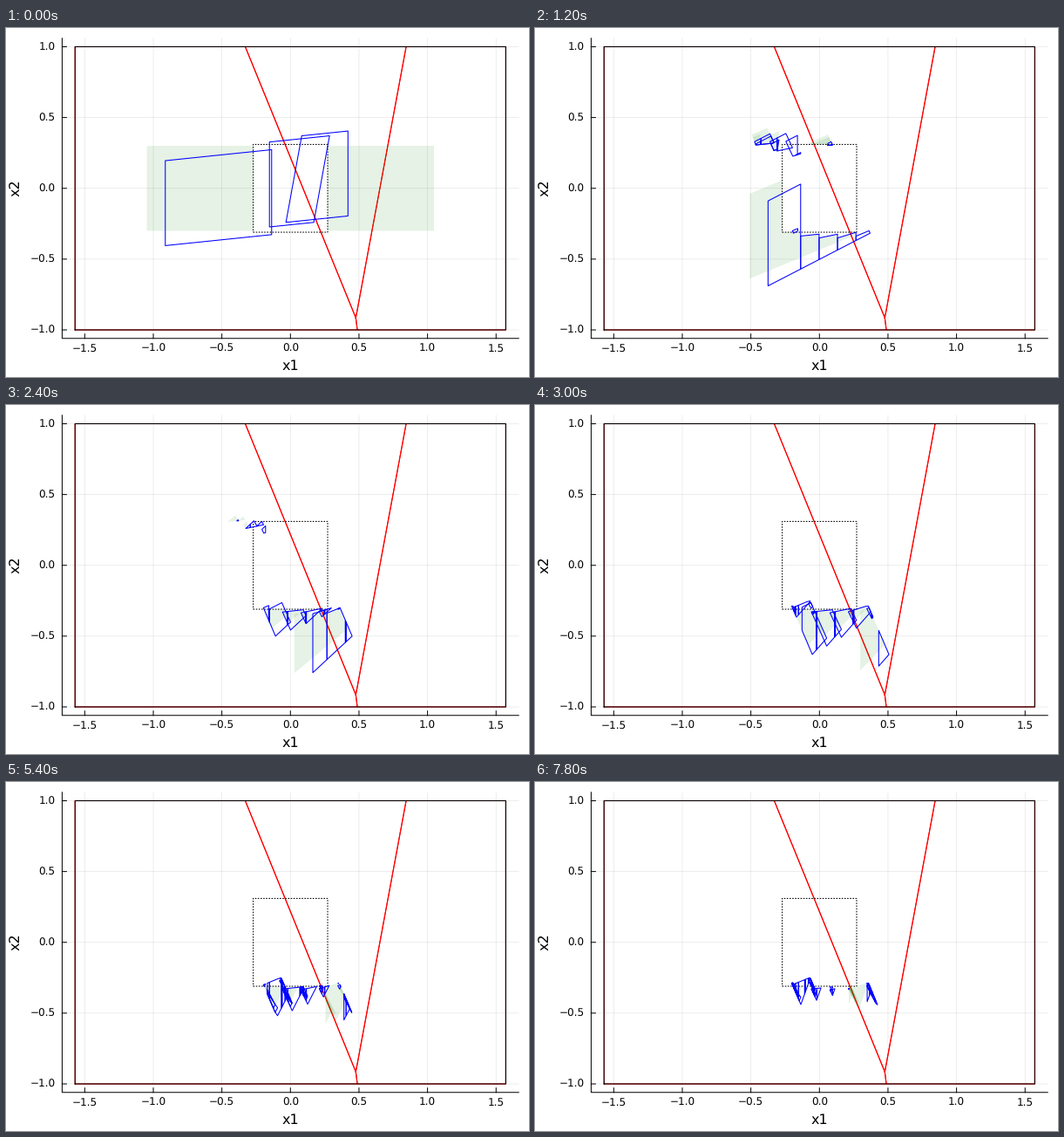
A matplotlib script for the animation above (8 s loop, 600x400 px).

```python
import matplotlib.pyplot as plt
import numpy as np
from matplotlib.animation import FuncAnimation
from matplotlib.collections import PolyCollection

W, H, DPI = 600, 400, 100
PX = 72 / DPI                      # one pixel in points
STEP_FRAMES, FRAMES, INTERVAL = 3, 80, 100
plt.rcParams.update({"font.family": "DejaVu Sans", "path.snap": False,
                     "text.hinting": "none"})

# Piecewise-affine dynamics: x1 gets a constant push per region, x2 integrates x1.
DT = 0.1
BOX_X, BOX_Y = 0.2715, 0.31
DOM_X, DOM_Y = np.pi / 2, 1.0
HUB = (0.477, -0.915)
TOP_L, TOP_R, FOOT = (-0.3295, 1.0), (0.844, 1.0), (0.488, -1.0)


def left_of(p, q):
    """Half-plane a*x + b*y + c >= 0 to the left of the ray p -> q."""
    a, b = p[1] - q[1], q[0] - p[0]
    return a, b, -(a * p[0] + b * p[1])


def flip(plane):
    return tuple(-v for v in plane)


RED_L, RED_R, RED_D = left_of(HUB, TOP_L), left_of(HUB, TOP_R), left_of(HUB, FOOT)
REGIONS = [
    ((RED_L, flip(RED_D)), 0.1345),
    ((RED_R, flip(RED_L)), -0.4245),
    ((RED_D, flip(RED_R)), -0.6275),
]
OUTSIDE = [(-1, 0, -BOX_X), (1, 0, -BOX_X), (0, 1, -BOX_Y), (0, -1, -BOX_Y)]


def clip(poly, plane):
    a, b, c = plane
    out = []
    for p, q in zip(poly, poly[1:] + poly[:1]):
        dp, dq = a * p[0] + b * p[1] + c, a * q[0] + b * q[1] + c
        if dp >= 0:
            out.append(p)
        if dp * dq < 0:
            t = dp / (dp - dq)
            out.append((p[0] + t * (q[0] - p[0]), p[1] + t * (q[1] - p[1])))
    return out


def solid(poly):
    area = sum(p[0] * q[1] - q[0] * p[1] for p, q in zip(poly, poly[1:] + poly[:1]))
    return len(poly) > 2 and abs(area) > 2e-7


def remove_box(polys):
    pieces = []
    for poly in polys:
        for plane in OUTSIDE:
            pieces.append(clip(poly, plane))
            poly = clip(poly, flip(plane))
    return [p for p in pieces if solid(p)]


def advance(polys):
    images = []
    for poly in polys:
        for planes, push in REGIONS:
            part = poly
            for plane in planes:
                part = clip(part, plane)
            if solid(part):
                images.append([(x + push, y + DT * x) for x, y in part])
    return images


def rect(w, h):
    return [(-w, -h), (w, -h), (w, h), (-w, h)]


def simulate(count):
    states, reach = [], [rect(np.pi / 3, 0.3)]
    for _ in range(count):
        current = remove_box(reach)
        reach = advance(current)
        states.append((current, reach))
    return states


STATES = simulate(-(-FRAMES // STEP_FRAMES))

LIM_X, LIM_Y = 1.06 * DOM_X, 1.06 * DOM_Y
AX_W, AX_H = 523.8, 344
UNIT_X, UNIT_Y = AX_W / 2 / LIM_X, AX_H / 2 / LIM_Y     # pixels per data unit
TICK = 5

fig = plt.figure(figsize=(W / DPI, H / DPI), dpi=DPI, facecolor="white")
ax = fig.add_axes([64.4 / W, 1 - 355.75 / H, AX_W / W, AX_H / H])
ax.set_xlim(-LIM_X, LIM_X)
ax.set_ylim(-LIM_Y, LIM_Y)
ax.axis("off")


def outline(points, color, width=1.0, **kw):
    xs, ys = zip(*points)
    ax.plot(xs, ys, color=color, lw=width * PX, clip_on=False,
            scalex=False, scaley=False, **kw)


def closed(points):
    return points + points[:1]


def label(x, y, text, size, **kw):
    fig.text(x / W, 1 - y / H, text, fontsize=size * PX, **kw)


def number(v):
    return f"{v:.1f}".replace("-", "\u2212")


grid = dict(color="black", alpha=0.1, width=0.7, zorder=1)
for v in np.arange(-1.5, 1.6, 0.5):
    outline([(v, -LIM_Y), (v, LIM_Y)], **grid)
    outline([(v, -LIM_Y), (v, -LIM_Y + TICK / UNIT_Y)], "black")
    label(326.3 + UNIT_X * v, 371.3, number(v), 12, ha="center", va="baseline")
for v in np.arange(-1, 1.1, 0.5):
    outline([(-LIM_X, v), (LIM_X, v)], **grid)
    outline([(-LIM_X, v), (-LIM_X + TICK / UNIT_X, v)], "black")
    label(56.5, 188 - UNIT_Y * v, number(v), 12, ha="right", va="baseline")
outline([(-LIM_X, LIM_Y), (-LIM_X, -LIM_Y), (LIM_X, -LIM_Y)], "black")
label(326.5, 391.5, "x1", 16, ha="center", va="baseline")
label(19, 183.5, "x2", 16, ha="right", va="center", rotation=90)

# Neighbouring regions share their red borders.
SW, SE, NE, NW = rect(DOM_X, DOM_Y)
for region in ([HUB, TOP_L, NW, SW, FOOT], [HUB, TOP_R, TOP_L],
               [HUB, FOOT, SE, NE, TOP_R]):
    outline(closed(region), "red", 1.1, zorder=2)
outline(closed([SW, SE, NE, NW]), "black", 1.05, zorder=2.1)
outline(closed(rect(BOX_X, BOX_Y)), "black", 1.05, zorder=4,
        ls=(0, (1.5, 1.5)), dash_capstyle="butt")

fills = PolyCollection([], facecolors=(0, 0.5, 0, 0.1), edgecolors="none", zorder=3)
edges = PolyCollection([], facecolors="none", edgecolors="blue",
                       linewidths=1.05 * PX, zorder=5)
ax.add_collection(fills, autolim=False)
ax.add_collection(edges, autolim=False)


def draw(frame):
    current, reach = STATES[frame // STEP_FRAMES]
    fills.set_verts(current)
    edges.set_verts(reach)
    return fills, edges


anim = FuncAnimation(fig, draw, frames=FRAMES, interval=INTERVAL,
                     repeat=True, repeat_delay=0, blit=False)
plt.show()
```
